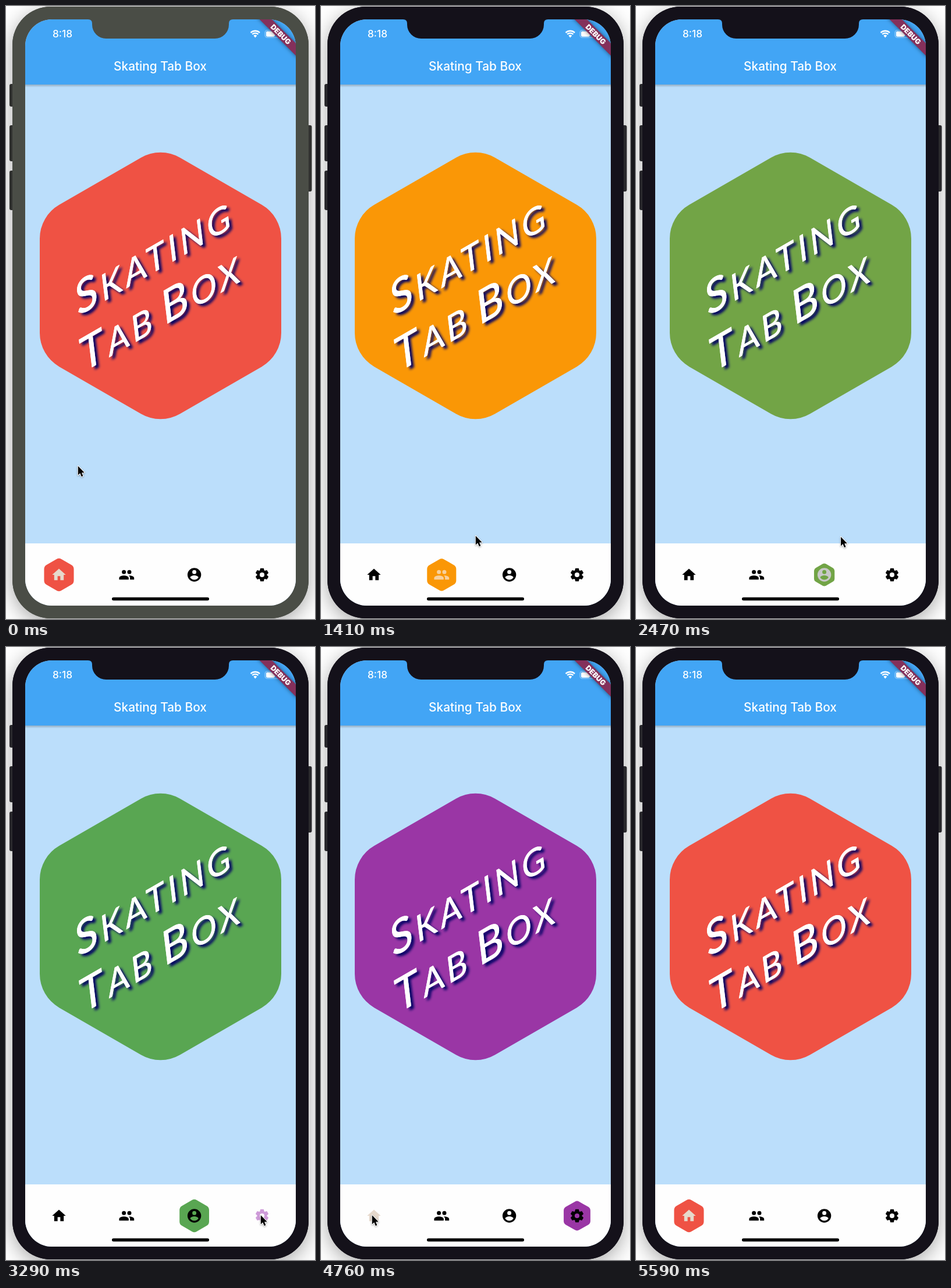
Animation, 531 px wide and 1054 px high, one loop 7120 ms. Source, as an HTML page with a canvas:

```html
<!DOCTYPE html>
<html lang="en">
<head>
<meta charset="utf-8">
<title>Skating Tab Box</title>
<style>
html, body { margin: 0; width: 100%; height: 100%; overflow: hidden; background: #fff; }
canvas { display: block; width: 531px; height: 1054px; }
</style>
</head>
<body>
<canvas id="stage" width="531" height="1054"></canvas>
<script>
const ctx = document.getElementById('stage').getContext('2d');
const LOOP = 7120, ROLL = 415;
const SANS = 'Inter, Roboto, sans-serif';
const NAV_Y = 978, ICON = 1.17;

const gear = (() => {
  const p = new Path2D();
  const ring = [[7.2, 27], [9.9, 14], [9.9, -14], [7.2, -27]];
  for (let k = 0; k < 6; k++) {
    ring.forEach(([r, deg], i) => {
      const a = (k * 60 - 90 - deg) * Math.PI / 180;
      const x = 12 + r * Math.cos(a), y = 12 + r * Math.sin(a);
      k || i ? p.lineTo(x, y) : p.moveTo(x, y);
    });
  }
  p.closePath();
  p.moveTo(15.5, 12);
  p.arc(12, 12, 3.5, 0, Math.PI * 2);
  return p;
})();

const people = new Path2D('M16 11a3 3 0 1 0 0-6a3 3 0 1 0 0 6zM8 11a3 3 0 1 0 0-6a3 3 0 1 0 0 6z' +
  'M8 13c-2.33 0-7 1.17-7 3.5V19h14v-2.5C15 14.17 10.33 13 8 13z' +
  'M16 13c-.3 0-.6 0-.97.05C16.2 13.9 17 15 17 16.5V19h6v-2.5C23 14.17 18.33 13 16 13z');
const account = new Path2D('M12 2a10 10 0 1 0 0 20a10 10 0 1 0 0-20zM12 5a3 3 0 1 1 0 6a3 3 0 1 1 0-6z' +
  'M12 19.2c-2.5 0-4.7-1.3-6-3.2c0-2 4-3.1 6-3.1s6 1.1 6 3.1c-1.3 1.9-3.5 3.2-6 3.2z');

const items = [
  { x: 91, color: [239, 82, 68], lit: '#e6d9cc', icon: new Path2D('M10 20v-6h4v6h5v-8h3L12 3 2 12h3v8z') },
  { x: 207.3, color: [250, 152, 5], lit: '#f8d09c', icon: people },
  { x: 323.6, color: [89, 166, 82], lit: '#c8c8c8', icon: account },
  { x: 440, color: [149, 53, 170], lit: '#ce9bd9', icon: gear }
];

// time of each tap and the item it selects
const taps = [[1000, 1], [2120, 2], [3290, 3], [4740, 0]];

// pointer tip: time, x, y
const path = [
  [0, 123, 790], [30, 123, 790], [710, 205, 984], [1030, 205, 984],
  [1400, 265, 910], [1560, 265, 910], [1880, 322, 984], [2120, 322, 984],
  [2290, 341, 910], [2420, 348, 908], [2820, 419, 993], [2850, 419, 993],
  [3060, 437, 976], [3330, 437, 976], [3680, 451, 906], [3890, 451, 906],
  [3940, 418, 912], [4530, 87, 976], [4760, 87, 976], [4940, 108, 943],
  [5180, 128, 912], [5520, 128, 912], [5530, 62, 859], [5590, 62, 859]
];

const rgb = c => `rgb(${c.map(Math.round).join()})`;
const mix = (a, b, u) => a.map((v, i) => v + (b[i] - v) * u);

function roundRect(x, y, w, h, r, fill) {
  ctx.beginPath();
  ctx.roundRect(x, y, w, h, r);
  ctx.fillStyle = fill;
  ctx.fill();
}

function rect(x, y, w, h, fill) {
  ctx.fillStyle = fill;
  ctx.fillRect(x, y, w, h);
}

function text(str, x, y, font, align) {
  ctx.font = font;
  ctx.textAlign = align;
  ctx.fillStyle = '#fff';
  ctx.fillText(str, x, y);
}

function hexagon(cx, cy, s, fill) {
  if (s <= 0) return;
  const R = 239.6 * s;
  const at = k => [cx + R * Math.sin(k * Math.PI / 3), cy - R * Math.cos(k * Math.PI / 3)];
  const [ax, ay] = at(0), [bx, by] = at(1);
  ctx.beginPath();
  ctx.moveTo((ax + bx) / 2, (ay + by) / 2);
  for (let k = 1; k <= 6; k++) ctx.arcTo(...at(k), ...at(k + 1), 67 * s);
  ctx.closePath();
  ctx.fillStyle = fill;
  ctx.fill();
}

function phone(active) {
  const shell = active ? '#14111a' : '#4a4d46';
  const key = active ? '#29282c' : '#30312f';
  rect(0, 0, 531, 1054, '#fff');
  ctx.save();
  ctx.shadowColor = 'rgba(0,0,0,.35)';
  ctx.shadowBlur = 34;
  ctx.shadowOffsetY = 8;
  roundRect(11, 1, 509, 1052, 66, shell);
  ctx.restore();
  for (const [y, h] of [[134, 39], [205, 62], [283, 68]]) roundRect(6, y, 7, h, [3, 0, 0, 3], key);
  roundRect(518, 205, 7.5, 114, [0, 3, 3, 0], key);
  roundRect(11, 1, 509, 1052, 66, shell);
  return shell;
}

function notch(shell) {
  ctx.beginPath();
  ctx.moveTo(141, 22);
  ctx.lineTo(141, 23);
  ctx.quadraticCurveTo(148, 23, 148, 30);
  ctx.arcTo(148, 56, 172, 56, 24);
  ctx.arcTo(383, 56, 383, 30, 24);
  ctx.lineTo(383, 30);
  ctx.quadraticCurveTo(383, 23, 390, 23);
  ctx.lineTo(390, 22);
  ctx.fillStyle = shell;
  ctx.fill();
}

function statusBar() {
  text('8:18', 97, 54, '500 17.3px ' + SANS, 'center');
  ctx.strokeStyle = ctx.fillStyle = '#fff';
  ctx.lineWidth = 2.4;
  const up = -Math.PI / 2;
  for (const r of [11.3, 7.4]) {
    ctx.beginPath();
    ctx.arc(428.3, 54, r, up - .76, up + .76);
    ctx.stroke();
  }
  ctx.beginPath();
  ctx.moveTo(428.3, 54.5);
  ctx.arc(428.3, 54, 4.2, up - .76, up + .76);
  ctx.fill();
  ctx.beginPath();
  ctx.roundRect(445.2, 41.7, 26, 12.6, 3.8);
  ctx.lineWidth = 1.1;
  ctx.strokeStyle = 'rgba(255,255,255,.5)';
  ctx.stroke();
  roundRect(447, 43.4, 15, 9.3, 2.2, '#fff');
}

function ribbon() {
  ctx.save();
  ctx.translate(498, 23);
  ctx.rotate(Math.PI / 4);
  ctx.shadowColor = 'rgba(0,0,0,.5)';
  ctx.shadowBlur = 7;
  rect(-50, 29, 100, 15, '#84305b');
  ctx.shadowColor = 'transparent';
  text('DEBUG', 0, 41, '900 12.4px ' + SANS, 'center');
  ctx.restore();
}

// small capitals on a tilted plane
function slanted(str, x, y) {
  ctx.save();
  ctx.setTransform(.866, -.5, .12, 1, x, y);
  ctx.letterSpacing = '6px';
  for (const shade of [true, false]) {
    ctx.shadowColor = shade ? '#000064' : 'transparent';
    ctx.shadowBlur = 4;
    ctx.shadowOffsetX = 5;
    ctx.shadowOffsetY = 4;
    let pen = 0;
    for (const word of str.toUpperCase().split(' ')) {
      for (const [part, size] of [[word[0], 79], [word.slice(1), 62]]) {
        text(part, pen, 0, `500 ${size}px Lato, sans-serif`, 'left');
        pen += ctx.measureText(part).width;
      }
      pen += 15;
    }
  }
  ctx.restore();
}

function navState(t) {
  let from = 0, to = 0, start = -ROLL;
  for (const [time, item] of taps) {
    if (t >= time) [from, to, start] = [to, item, time];
  }
  const u = Math.min(1, (t - start) / ROLL);
  return { from, to, u, color: rgb(mix(items[from].color, items[to].color, u)) };
}

function navBar({ from, to, u, color }) {
  rect(33, 924, 465, 107, '#fefefe');
  // the marker shrinks away, then grows at the new item
  hexagon(items[u < .5 ? from : to].x, NAV_Y, .123 * Math.abs(1 - 2 * u), color);
  items.forEach((item, i) => {
    ctx.save();
    ctx.translate(item.x - 12 * ICON, NAV_Y - 12 * ICON);
    ctx.scale(ICON, ICON);
    ctx.fillStyle = i === to ? item.lit : '#000';
    ctx.fill(item.icon, 'evenodd');
    ctx.restore();
  });
  roundRect(182, 1016.8, 167, 5.4, 2.7, '#000');
}

function pointer(t) {
  const n = path.findIndex(k => k[0] > t);
  if (n < 1) return;
  const a = path[n - 1], b = path[n];
  const u = (t - a[0]) / (b[0] - a[0]);
  const [, x, y] = mix(a, b, u * u * (3 - 2 * u));
  ctx.save();
  ctx.translate(x + .8, y + 1);
  ctx.beginPath();
  for (const p of [[0, 0], [0, 15.6], [3.5, 12.3], [6, 18.2], [8.6, 17.1], [6.2, 11.4], [10.9, 11.2]]) ctx.lineTo(...p);
  ctx.closePath();
  ctx.lineJoin = 'round';
  ctx.lineWidth = 2;
  ctx.strokeStyle = '#fff';
  ctx.shadowColor = 'rgba(0,0,0,.35)';
  ctx.shadowBlur = 3;
  ctx.shadowOffsetY = 1;
  ctx.stroke();
  ctx.shadowColor = 'transparent';
  ctx.fillStyle = '#000';
  ctx.fill();
  ctx.restore();
}

function draw(t) {
  const nav = navState(t);
  const shell = phone(t >= 60);
  ctx.save();
  ctx.beginPath();
  ctx.roundRect(33, 23, 465, 1008, 46);
  ctx.clip();
  rect(33, 23, 465, 1008, '#bbdefb');
  const shade = ctx.createLinearGradient(0, 135, 0, 140);
  shade.addColorStop(0, 'rgba(0,0,0,.22)');
  shade.addColorStop(1, 'rgba(0,0,0,0)');
  rect(33, 135, 465, 5, shade);
  rect(33, 23, 465, 112, '#42a5f5');
  text('Skating Tab Box', 265, 111.3, '500 20.8px ' + SANS, 'center');
  hexagon(265.5, 481, 1, nav.color);
  slanted('Skating', 123, 534);
  slanted('Tab Box', 131, 631);
  navBar(nav);
  statusBar();
  ribbon();
  ctx.restore();
  notch(shell);
  pointer(t);
}

const began = performance.now();
function tick() {
  draw((performance.now() - began) % LOOP);
  requestAnimationFrame(tick);
}
tick();
</script>
</body>
</html>
```
